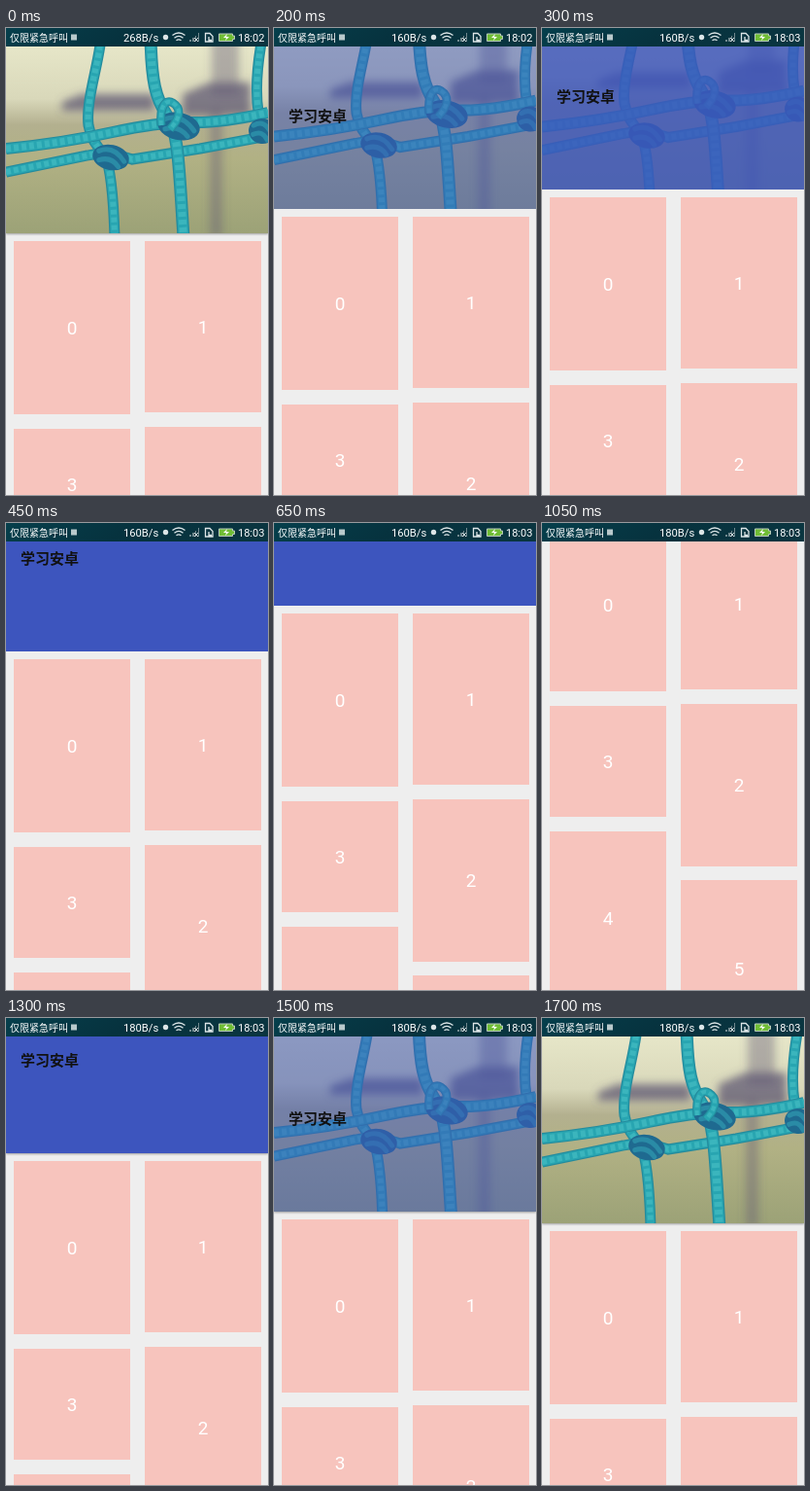
Recreate the animation shown at these times as an HTML page. Size 270x480 px, loop 1750 ms.

```html
<!DOCTYPE html>
<html lang="zh-CN">
<head>
<meta charset="utf-8">
<style>
html, body { margin: 0; width: 100%; height: 100%; overflow: hidden; background: #eee; }
#stage { position: relative; width: 270px; height: 480px; overflow: hidden; background: #eee; }
#page { position: absolute; inset: 0; will-change: transform; }
#header { position: absolute; top: 19px; width: 270px; height: 192px; }
#clip { position: absolute; inset: 0; overflow: hidden; }
#photo, #tint { position: absolute; inset: 0; }
#tint { background: #3d55be; }
#title {
  position: absolute; left: 15px; top: 86px; color: #111;
  font: bold 15px/20px "Noto Sans CJK SC", "Noto Sans CJK", sans-serif; white-space: nowrap;
}
.card {
  position: absolute; width: 120px; background: #f7c4bd; color: #fff;
  display: flex; align-items: center; justify-content: center;
  font: 19px Roboto, sans-serif;
}
#status { position: absolute; left: 0; top: 0; }
#status text { fill: #fff; font-family: Roboto, "Noto Sans CJK SC", "Noto Sans CJK", sans-serif; }
</style>
</head>
<body>
<div id="stage">
  <div id="page">
    <div id="header">
      <div id="clip">
        <svg id="photo" width="270" height="192" viewBox="0 19 270 192">
          <defs>
            <linearGradient id="field" x2="0" y2="1">
              <stop offset="0" stop-color="#e6e6c8"/>
              <stop offset=".28" stop-color="#d9d8ba"/>
              <stop offset=".42" stop-color="#b3b08f"/>
              <stop offset=".6" stop-color="#b1b184"/>
              <stop offset="1" stop-color="#9ca277"/>
            </linearGradient>
            <filter id="soft" x="-20%" y="-20%" width="140%" height="140%">
              <feGaussianBlur stdDeviation="4"/>
            </filter>
          </defs>
          <path fill="url(#field)" d="M0 19h270v192H0z"/>
          <g filter="url(#soft)" fill="#615a75">
            <path d="M58 76l20-8h75v17H58zM182 68l28-12h42v34h-70z" opacity=".75"/>
            <path d="M212 10h28v60h-28zM210 85h13v130h-13z" opacity=".4"/>
          </g>
          <g id="ropes" fill="none"></g>
        </svg>
        <div id="tint"></div>
        <div id="title">学习安卓</div>
      </div>
    </div>
  </div>
  <svg id="status" width="270" height="19">
    <defs>
      <linearGradient id="bar" x2="1" y2=".1">
        <stop offset="0" stop-color="#063f4c"/>
        <stop offset=".5" stop-color="#06323e"/>
        <stop offset="1" stop-color="#0a3540"/>
      </linearGradient>
    </defs>
    <path fill="url(#bar)" d="M0 0h270v19H0z"/>
    <text x="4" y="13.5" font-size="10">仅限紧急呼叫</text>
    <rect x="67" y="6.5" width="6" height="6" fill="#b9c9cc"/>
    <text id="rate" x="121" y="13.5" font-size="11.2"></text>
    <circle cx="164.5" cy="9.5" r="2.7" fill="#dce5e7"/>
    <g fill="none" stroke="#dce5e7" stroke-width="1.3">
      <path d="M171.500 7.500q6.500-5 13 0M173.500 10.200q4.500-3.600 9 0M175.500 12.800q2.500-2 5 0"/>
      <path d="M205.500 5.500h4.500l3 3v5.500h-7.500zM209 9v3.500h3"/>
    </g>
    <path d="M189 14h2v-2h-2zM192 14h2v-4h-2zM195 14h1v-6h-1zM198 14h1V5h-1z" fill="#71898f"/>
    <path d="M194 10l4 4m0-4l-4 4" stroke="#dce5e7"/>
    <path d="M219.500 6h14v2h2v3.500h-2v2h-14z" fill="#70bd35" stroke="#b8cbbb"/>
    <path d="M228 6l-4 4h3l-1 3 4-4h-3z" fill="#fff"/>
    <text id="clock" x="239" y="13.5" font-size="11"></text>
  </svg>
</div>
<script>
const LOOP = 1750, STEP = 50;
const $ = id => document.getElementById(id);

// Label, left, top, height
const cards = [
  [0, 8, 219, 178], [1, 143, 219, 176], [3, 8, 412, 114],
  [2, 143, 410, 167], [4, 8, 541, 178], [5, 143, 591, 182]
];
for (const [label, left, top, height] of cards) {
  const card = document.createElement("div");
  card.className = "card";
  card.textContent = label;
  card.style.cssText = `left:${left}px;top:${top}px;height:${height}px`;
  $("page").append(card);
}

function rope(d, width) {
  const strand = (color, w, dash) =>
    `<path d="${d}" stroke="${color}" stroke-width="${w}" stroke-dasharray="${dash}"/>`;
  return strand("#248b9d", width, "none") +
    strand("#28a5b1", width - 2.5, "none") +
    strand("#3bb5bd", width - 5, "5 3");
}
function knot(x, y, rx, ry) {
  return `<g transform="translate(${x} ${y}) rotate(12)">
    <ellipse rx="${rx}" ry="${ry}" fill="#1f6a90"/>
    <path d="M${-rx * .7} ${-ry * .3}Q0 ${-ry} ${rx * .75} ${ry * .1}M${-rx * .6} ${ry * .4}Q0 ${-ry * .1} ${rx * .5} ${ry * .6}"
      stroke="#2a8ba6" stroke-width="5" stroke-linecap="round"/></g>`;
}
$("ropes").innerHTML =
  rope("M98 10C95 40 82 75 85 100Q88 118 102 130Q110 150 112 215", 11) +
  rope("M264 10Q252 75 266 108", 11) +
  rope("M0 148L84 131Q105 126 130 135L200 124L270 111", 11) +
  knot(108, 133, 19, 13) +
  rope("M149 10C150 55 154 72 166 90S178 140 183 215", 13) +
  rope("M0 124Q60 118 110 107T190 97T270 87", 12) +
  knot(178, 101, 22, 14) + knot(264, 106, 14, 13) +
  rope("M160 100C158 82 164 72 172 77S181 91 169 104", 9);

const scrollKeys = [
  [0, 0], [50, 2], [100, 8], [200, 25], [300, 45], [450, 79], [650, 126],
  [1050, 224], [1100, 214], [1200, 142], [1300, 72], [1400, 32],
  [1500, 12], [1600, 2], [1650, 0], [LOOP, 0]
];
const tintKeys = [[0, 0], [50, .04], [200, .5], [350, 1], [1350, 1], [1650, .06], [1700, 0], [LOOP, 0]];

function valueAt(keys, t) {
  const i = keys.findIndex(([time]) => time > t);
  const [t0, v0] = keys[i - 1], [t1, v1] = keys[i];
  return v0 + (v1 - v0) * (t - t0) / (t1 - t0);
}

function draw(now) {
  const t = Math.floor((now % LOOP) / STEP) * STEP;
  const scroll = Math.round(valueAt(scrollKeys, t));
  const tint = valueAt(tintKeys, t);
  $("page").style.transform = `translateY(${-scroll}px)`;
  $("photo").style.transform = `translateY(${scroll / 2}px)`;
  $("tint").style.opacity = tint;
  $("title").style.opacity = Math.min(1, tint * 2);
  $("header").style.boxShadow = t < 100 || t > 1100 ? "0 1px 2px #0005" : "none";
  $("rate").textContent = (t < 100 ? 268 : t < 850 ? 160 : 180) + "B/s";
  $("clock").textContent = t < 300 ? "18:02" : "18:03";
}

const start = performance.now();
function tick() {
  draw(performance.now() - start);
  requestAnimationFrame(tick);
}
draw(0);
requestAnimationFrame(tick);
</script>
</body>
</html>
```
